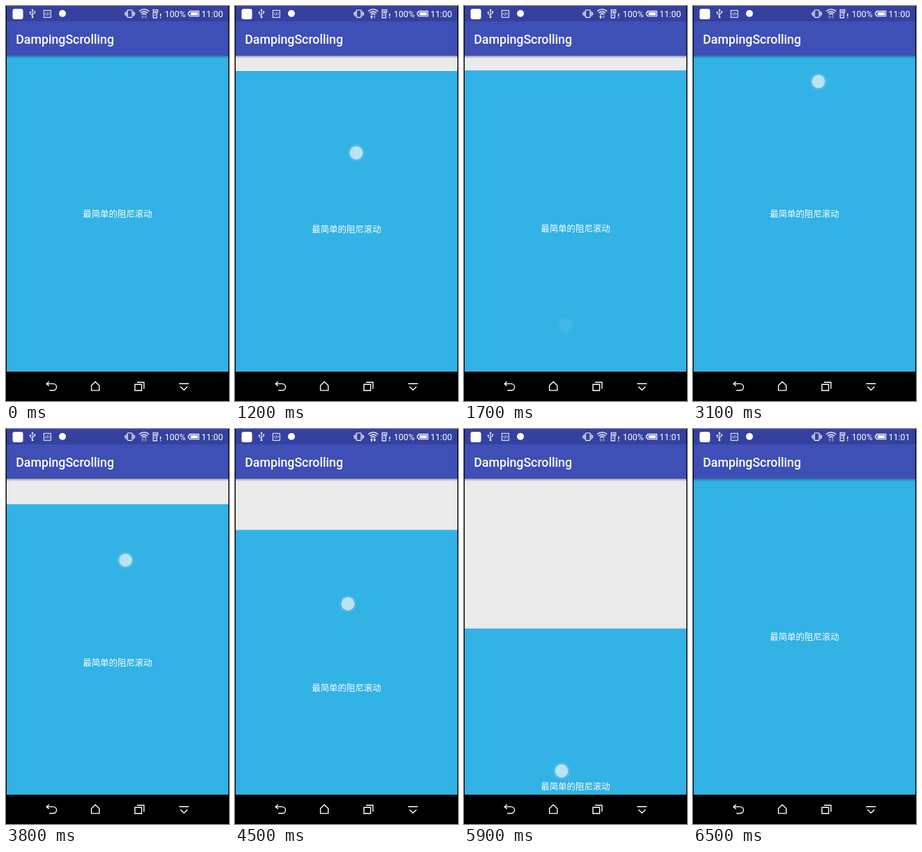
These frames come from a looping animation (320 by 565 pixels, 6600 ms). An HTML page:

```html
<!DOCTYPE html>
<html lang="zh">
<head>
<meta charset="utf-8">
<title>DampingScrolling</title>
<style>
  html, body { margin: 0; width: 100%; height: 100%; overflow: hidden; background: #000; }
  svg { display: block; }
  text { fill: #fff; font-family: Roboto, sans-serif; font-size: 12.44px; }
  .title { font-size: 17.78px; font-weight: 500; }
  .label { font-family: "Noto Sans CJK SC", "Noto Sans CJK", sans-serif; text-anchor: middle; }
  .line { fill: none; stroke: #fff; }
  .solid { fill: #fff; }
</style>
</head>
<body>
<svg width="320" height="565" viewBox="0 0 320 565">
  <defs>
    <linearGradient id="shade" x2="0" y2="1">
      <stop offset="0" stop-color="#000" stop-opacity=".32"/>
      <stop offset="1" stop-color="#000" stop-opacity="0"/>
    </linearGradient>
    <clipPath id="page"><rect x="1" y="71" width="318" height="451.7"/></clipPath>
  </defs>

  <rect width="320" height="565" fill="#000"/>
  <rect x="1" y="71" width="318" height="451.7" fill="#ebebeb"/>
  <g clip-path="url(#page)">
    <g id="sheet">
      <rect x="1" y="71.2" width="318" height="452" fill="#32b2e5"/>
      <text class="label" x="160" y="302.2">最简单的阻尼滚动</text>
    </g>
    <rect x="1" y="71" width="318" height="4" fill="url(#shade)"/>
  </g>

  <rect x="1" width="318" height="22" fill="#35419f"/>
  <rect x="1" y="22" width="318" height="49.2" fill="#3e4fb5"/>
  <text class="title" x="14.2" y="53.8">DampingScrolling</text>

  <!-- status bar, left -->
  <rect class="solid" x="9.5" y="4" width="15" height="15" rx="3"/>
  <g class="line" stroke-width="1">
    <path d="M38 6v9.5M38 13.5l-3.2-2v-2M38 12l3.2-1.8v-2"/>
    <rect x="54.3" y="6.3" width="10" height="10"/>
    <path d="M57.7 9.5l-1.6 1.8 1.6 1.8M60.9 9.5l1.6 1.8-1.6 1.8M59.9 9l-1.2 4.6" stroke-width=".8"/>
  </g>
  <path class="solid" d="M38 4l1.7 2.6h-3.4zM40.3 7.2h1.9v1.9h-1.9z"/>
  <circle class="solid" cx="34.8" cy="9.2" r="1.1"/>
  <circle class="solid" cx="38" cy="15.9" r="1.4"/>
  <circle class="solid" cx="81" cy="10.7" r="5"/>

  <!-- status bar, right -->
  <g class="line" stroke-width="1.1">
    <rect x="174.4" y="5.8" width="6.6" height="10.6" rx=".8"/>
    <path d="M172.6 7.5v7.2M182.8 7.5v7.2M170.9 9v4.2M184.5 9v4.2"/>
    <path d="M191 7.6q7.2-6 14.4 0M193.2 10q5-4 10 0M195.2 12.2q3-2.4 6 0" stroke-width="1.3"/>
    <path d="M211.2 5.2h6.6v3.6l-1.4 1.6v6.5h-5.2z"/>
    <path d="M212.5 7.6h4M212.5 9.6h3.6M212.5 13h2.4" stroke-width="1.2"/>
    <path d="M221.8 10.8v4M221.8 16v1.3" stroke-width="1.4"/>
    <path d="M263.4 7.4h13.4v7.4h-13.4v-2h-1.8v-3.4h1.8z"/>
  </g>
  <rect class="solid" x="264.8" y="8.8" width="10.6" height="4.6"/>
  <path id="up" class="solid" d="M196 13l2.1 2.6h-1.3v2.4h-1.6v-2.4h-1.3z"/>
  <path id="down" class="solid" d="M200.3 18l2.1-2.6h-1.3V13h-1.6v2.4h-1.3z"/>
  <text x="227.7" y="16">100%</text>
  <text id="clock" x="280.6" y="16">11:00</text>

  <!-- navigation bar -->
  <g class="line" stroke-width="1.4">
    <path d="M61.8 537.2l-3.6 3.2 3.6 3.2M58.6 540.4h9.2a4.7 4.7 0 0 1 0 9.4h-5.6"/>
    <path d="M122.6 549.9v-7.2l5.6-5.2 5.6 5.2v7.2z"/>
    <path d="M185 541.2h9.6v8.8h-9.6zM188 538.3h10v9.2"/>
    <path d="M248.4 540.2h14M250.4 544.6l5 4.6 5-4.6"/>
  </g>

  <g id="touch">
    <circle r="12.3" fill="#8fc8dc" fill-opacity=".32"/>
    <circle r="9.4" fill="#b9e3f3"/>
  </g>
</svg>
<script>
  const LOOP = 6600, STEP = 100, RETURN = 400, DAMPING = 0.59;

  // Each path point is [ms, x, y]; the sheet follows once the finger passes "grip".
  const drags = [
    { grip: 173, path: [[1000, 178, 155], [1100, 177, 171], [1200, 174, 210],
                        [1300, 166, 290], [1400, 155, 385], [1500, 146, 457]] },
    { grip: 126, path: [[3100, 180, 108], [3200, 179, 122], [3700, 173, 180],
                        [4400, 163, 233], [4500, 162, 250], [5300, 144, 387],
                        [5900, 140, 489], [6100, 139, 510]] }
  ];

  const [sheet, touch, up, down, clock] =
    ["sheet", "touch", "up", "down", "clock"].map(id => document.getElementById(id));
  const between = (t, from, to) => t >= from && t < to;

  function fingerAt(path, t) {
    const i = path.findIndex(p => p[0] >= t);
    if (i < 0) return path[path.length - 1].slice(1);
    if (i === 0) return path[0].slice(1);
    const a = path[i - 1], b = path[i], k = (t - a[0]) / (b[0] - a[0]);
    return [1, 2].map(n => a[n] + (b[n] - a[n]) * k);
  }

  function draw(t) {
    let offset = 0, alpha = 0;
    for (const { grip, path } of drags) {
      const release = path[path.length - 1][0];
      if (!between(t, path[0][0], release + RETURN)) continue;
      const [x, y] = fingerAt(path, t);
      alpha = (1 - Math.max(0, t - release) / RETURN) ** 3;
      offset = Math.max(0, y - grip) * DAMPING * alpha;
      touch.setAttribute("transform", `translate(${x} ${y})`);
    }
    touch.setAttribute("opacity", alpha);
    sheet.setAttribute("transform", `translate(0 ${offset})`);

    const busy = between(t, 4000, 4800);
    up.setAttribute("opacity", busy || between(t, 1000, 2100) ? 1 : 0.4);
    down.setAttribute("opacity", busy ? 1 : 0.4);
    clock.textContent = t < 4800 ? "11:00" : "11:01";
  }

  const start = performance.now();
  function tick() {
    const t = (performance.now() - start) % LOOP;
    draw(Math.floor(t / STEP) * STEP);
    requestAnimationFrame(tick);
  }
  tick();
</script>
</body>
</html>
```
